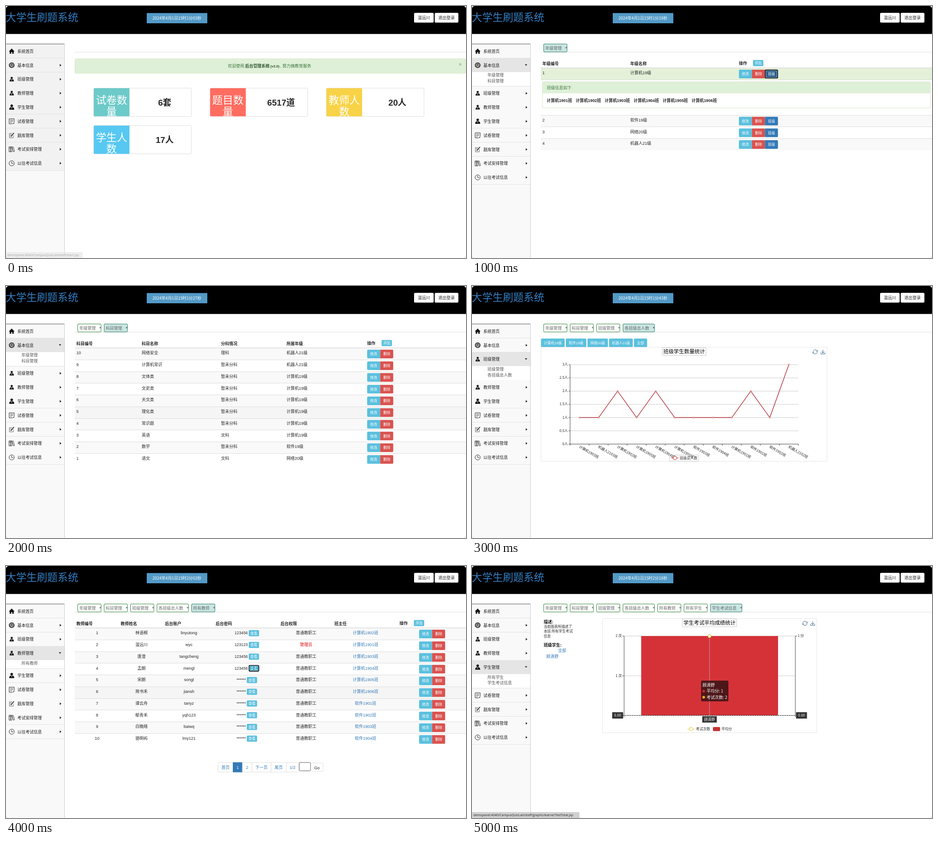
An HTML page with a canvas that plays this animation: 1010 by 554 pixels, repeating every 6000 ms.

```html
<!DOCTYPE html>
<html lang="zh-CN">
<head>
<meta charset="utf-8">
<title>刷题系统</title>
<style>
html, body { margin: 0; width: 100%; height: 100%; overflow: hidden; background: #fff; }
canvas { display: block; width: 1010px; height: 554px; }
</style>
</head>
<body>
<canvas id="stage"></canvas>
<script>
const W = 1010, H = 554, STEP = 1000;
const canvas = document.getElementById('stage');
const c = canvas.getContext('2d');
const dpr = window.devicePixelRatio || 1;
canvas.width = W * dpr;
canvas.height = H * dpr;

const ARIAL = '"Liberation Sans", "Noto Sans CJK SC", "Noto Sans CJK", sans-serif';
const UI = '"Noto Sans CJK SC", "Noto Sans CJK", sans-serif';
const URL_FONT = '"Open Sans", sans-serif';
const INFO = '#5bc0de', DANGER = '#d9534f', BLUE = '#337ab7', INK = '#262626', RED = '#c23531';

const ADMIN = '温远川', STUDENT = '顾清野';
const MENU = ['系统首页', '基本信息', '班级管理', '教师管理', '学生管理', '试卷管理', '题库管理', '考试安排管理', '以往考试信息'];
const TABS = ['年级管理', '科目管理', '班级管理', '各班级总人数', '所有教师', '所有学生', '学生考试信息'];

// ---- drawing helpers ----

// y is the vertical centre of the glyphs
function text(s, x, y, o = {}) {
  const size = o.size || 9;
  c.font = `${o.weight || 400} ${size}px ${o.font || ARIAL}`;
  c.textAlign = o.align || 'left';
  c.textBaseline = 'alphabetic';
  c.fillStyle = o.color || INK;
  c.fillText(s, x, y + size * 0.37);
}

function mid(s, x, y, o) { text(s, x, y, { ...o, align: 'center' }); }

function rect(x, y, w, h, fill) {
  c.fillStyle = fill;
  c.fillRect(x, y, w, h);
}

function box(x, y, w, h, fill, stroke, r = 0, lw = 1) {
  c.beginPath();
  c.roundRect(x, y, w, h, r);
  if (fill) { c.fillStyle = fill; c.fill(); }
  if (stroke) { c.strokeStyle = stroke; c.lineWidth = lw; c.stroke(); }
}

function path(pts, stroke, lw = 1, fill) {
  c.beginPath();
  pts.forEach(([x, y], i) => i ? c.lineTo(x, y) : c.moveTo(x, y));
  if (fill) { c.closePath(); c.fillStyle = fill; c.fill(); }
  if (stroke) { c.strokeStyle = stroke; c.lineWidth = lw; c.stroke(); }
}

function dot(x, y, r, fill, stroke, lw = 1) {
  c.beginPath();
  c.arc(x, y, r, 0, Math.PI * 2);
  if (fill) { c.fillStyle = fill; c.fill(); }
  if (stroke) { c.strokeStyle = stroke; c.lineWidth = lw; c.stroke(); }
}

function button(s, x, y, w, h, fill, r = 2) {
  box(x, y, w, h, fill, null, r);
  mid(s, x + w / 2, y + h / 2, { size: 7.75, color: '#fff', weight: 500 });
}

function focusRing(x, y, w, h) {
  box(x + .8, y + .8, w - 1.6, h - 1.6, null, '#fff', 1.5, .8);
  box(x - .4, y - .4, w + .8, h + .8, null, '#101010', 2, 1.6);
}

// ---- page frame ----

const person = s => (x, y) => {
  dot(x, y - 3 * s, 2.5 * s, '#111');
  c.beginPath();
  c.moveTo(x - 5 * s, y + 5 * s);
  c.quadraticCurveTo(x - 5 * s, y, x - 1.5 * s, y);
  c.lineTo(x + 1.5 * s, y);
  c.quadraticCurveTo(x + 5 * s, y, x + 5 * s, y + 5 * s);
  c.fill();
  path([[x, y + .4], [x + .9, y + 1.6], [x, y + 4], [x - .9, y + 1.6]], null, 1, '#ddd');
};

const ICONS = [
  (x, y) => {
    path([[x - 6.3, y + .6], [x, y - 5.8], [x + 6.3, y + .6]], null, 1, '#111');
    rect(x - 4.4, y, 8.8, 5.5, '#111');
    rect(x - 1.2, y + 2, 2.4, 3.5, '#f5f5f5');
  },
  (x, y) => {
    dot(x, y, 6.2, '#444');
    box(x - 3, y - 2.6, 6, 4, null, '#fff', .5, .9);
    path([[x - 2.2, y + 3], [x + 2.2, y + 3]], '#fff', .9);
  },
  person(.95), person(.95), person(1.1),
  (x, y) => {
    path([[x + 2, y + 5.5], [x - 5.5, y + 5.5], [x - 5.5, y - 5.5], [x + 5.5, y - 5.5], [x + 5.5, y + 2]], '#222');
    for (const k of [-2.5, 0, 2.5]) path([[x - 3.2, y + k], [x + (k > 1 ? 0 : 3.2), y + k]], '#222', .8);
    path([[x + 2, y + 5.5], [x + 5.8, y + 2], [x + 5.2, y + 5]], null, 1, '#222');
  },
  (x, y) => {
    path([[x + 3.5, y], [x + 3.5, y + 5.5], [x - 5, y + 5.5], [x - 5, y - 4], [x + 1, y - 4]], '#555', .9);
    path([[x - 2, y + 3], [x + 5, y - 5.2]], '#222', 1.7);
    path([[x - 3.5, y - 1.5], [x, y - 1.5]], '#555', .8);
    path([[x - 3.5, y + 1], [x - 1, y + 1]], '#555', .8);
  },
  (x, y) => {
    for (const k of [-5.8, -2.6]) {
      box(x + k, y - 5.5, 3, 11, null, '#222', 0, .9);
      path([[x + k, y - 2.8], [x + k + 3, y - 2.8]], '#222', .7);
    }
    path([[x + .8, y - 4.8], [x + 3.3, y - 5.5], [x + 6.2, y + 4.8], [x + 3.7, y + 5.5], [x + .8, y - 4.8]], '#222', .9);
  },
  (x, y) => {
    dot(x, y, 5.6, null, '#222', 1);
    path([[x, y - 3.6], [x, y + .4], [x + 3.4, y + .4]], '#222', 1);
  }
];

function header(time) {
  box(0, 0, W, 61.5, '#000', null, [6, 6, 0, 0]);
  text('大学生刷题系统', -.4, 25, { size: 22.75, color: '#337fc4', font: UI });
  rect(309, 15.5, 133, 22.5, '#539ac7');
  mid(time, 375.3, 26.7, { size: 8.85, color: '#fff', font: UI, weight: 500 });
  box(896, 15, 43, 21.5, '#fff', null, 2.5);
  box(941.3, 15, 52, 21.5, '#fff', null, 2.5);
  mid(ADMIN, 917.5, 26);
  mid('退出登录', 967.3, 26);
}

function sidebar(open, subs, itemFill) {
  rect(0, 83, 128, H - 83, '#f9f9f9');
  let y = 99.4;
  MENU.forEach((name, i) => {
    const top = Math.round(y - 15.4), active = i === open;
    rect(0, top, 128, 31, active ? '#e5e5e5' : itemFill);
    ICONS[i](12.5, y);
    text(name, 25, y, { size: 8.95, font: UI, color: '#1c1c1c', weight: 500 });
    if (active) path([[116, y - 2], [121.4, y - 2], [118.7, y + 1.2]], null, 1, INK);
    else if (i) path([[118, y - 2.8], [121.6, y], [118, y + 2.8]], null, 1, INK);
    if (active) {
      const h = 6 + 12.5 * subs.length;
      rect(0, y + 15, 128, h + 1, '#fff');
      subs.forEach((s, k) => text(s, 34, y + 21.7 + 12.5 * k, { size: 8.95, color: '#555', font: UI }));
      y += h;
    }
    rect(0, Math.round(y + 14.8), 128, 1, '#e2e2e2');
    y += 30.8;
  });
  rect(0, 83, 128, 1, '#555');
  rect(128, 83, 1, H - 83, '#ccc');
}

function tabs(count) {
  rect(151, 101, W - 151, 1, '#e1e1e1');
  let x = 157;
  TABS.slice(0, count).forEach((name, i) => {
    const w = name.length * 9 + 16.2, on = i === count - 1;
    box(x + .5, 83.5, w - 1, 17.5, on ? '#c9e6e5' : '#fff', on ? '#2f7d58' : '#2f8437', 1.5);
    text(name, x + 4, 92.8, { color: '#666', font: UI });
    mid('×', x + w - 2.4, 91, { size: 7, color: '#111' });
    x += w + 5.8;
  });
}

function statusBar(s, w, fill, color) {
  box(0, 541, w, 13, fill, null, [0, 2, 0, 0]);
  text(s, 3, 547.6, { size: 7, color, font: URL_FONT });
}

function corners() {
  c.strokeStyle = '#ddd';
  c.lineWidth = 1;
  for (const [x, from] of [[6, Math.PI / 2], [W - 6, 0]]) {
    c.beginPath();
    c.arc(x, H - 6, 6, from + .3, from + Math.PI / 2 - .3);
    c.stroke();
  }
}

// ---- tables ----

const PITCH = 25.75, TOP = 136.5, HOVERED = 5;

function heads(names, xs, addX) {
  names.forEach((s, i) => text(s, xs[i], s === '操作' ? 125.3 : 126.2, { weight: 700 }));
  button('添加', addX, 118.7, 22.7, 13.6, INFO);
  rect(151, 135.5, W - 151, 1.3, '#d8d8d8');
}

function rowBack(y, fill) {
  rect(151, y, W - 151, PITCH, fill);
  rect(151, Math.round(y - .4), W - 151, 1, '#ddd');
}

const stripe = i => i === HOVERED ? '#f5f5f5' : i % 2 ? '#fff' : '#f9f9f9';

function editButtons(x, y) {
  button('修改', x, y + 3.5, 28.6, 19, INFO, [2, 0, 0, 2]);
  button('删除', x + 28.6, y + 3.5, 28.6, 19, DANGER, [0, 2, 2, 0]);
}

// ---- charts ----

function chartIcons(x, y) {
  const col = '#4b7799';
  c.strokeStyle = col;
  c.lineWidth = 1.1;
  for (const a of [.2, Math.PI + .2]) {
    c.beginPath();
    c.arc(x, y, 4.6, a, a + 2.5);
    c.stroke();
  }
  path([[x + 5.4, y - 3.6], [x + 5.2, y - .2], [x + 2.2, y - 1.2]], col, 1);
  path([[x - 5.4, y + 3.6], [x - 5.2, y + .2], [x - 2.2, y + 1.2]], col, 1);
  const d = x + 17;
  path([[d, y - 4.6], [d, y + 2.6]], col, 1.1);
  path([[d - 3, y - .4], [d, y + 2.6], [d + 3, y - .4]], col, 1.1);
  path([[d - 4.5, y + 1.5], [d - 4.5, y + 4.8], [d + 4.5, y + 4.8], [d + 4.5, y + 1.5]], col, 1.1);
}

function chartTitle(s, x, y, w) {
  box(x - w / 2, y, w, 17.3, '#fff', '#ccc');
  mid(s, x, y + 8.3, { size: 11.45, color: '#000', font: UI });
}

const label = (s, x, y, o) => text(s, x, y, { size: 7.75, font: UI, ...o });

function legendLine(x, y, col) {
  path([[x, y], [x + 16, y]], col, 1.2);
  dot(x + 8, y, 3.8, '#fff', col, 1.2);
}

// ---- scenes ----

function home() {
  box(151.5, 116, 858, 32, '#dff0d8', '#d6e9c6', 2.5);
  const green = '#3c763d';
  text('欢迎使用', 487.3, 132, { color: green });
  text('后台管理系统', 525, 132, { color: '#2b542c', weight: 700, size: 8.95 });
  text('(v2.0)', 580.3, 132, { color: '#2b542c', weight: 700, size: 7.7 });
  text(', 努力做教育服务', 602, 132, { color: green });
  mid('×', 997.3, 128, { size: 10.5, color: '#a0aa9b', weight: 700 });
  const cards = [
    ['试卷数', '量', '6套', '#6ccac9'], ['题目数', '量', '6517道', '#ff6c60'],
    ['教师人', '数', '20人', '#f8d347'], ['学生人', '数', '17人', '#57c8f2']
  ];
  cards.forEach(([a, b, value, col], i) => {
    const x = 192.5 + 255.4 * (i % 3), y = 180.5 + 82.3 * Math.floor(i / 3);
    box(x, y, 214.5, 62.3, '#fff', '#ddd', 2.5);
    box(x + .3, y + .3, 78.3, 61.8, col, null, [2, 0, 0, 2]);
    const o = { size: 22.9, color: '#fff', weight: 300, font: UI };
    mid(a, x + 39.3, y + 25.6, o);
    mid(b, x + 39.3, y + 51, o);
    mid(value, x + 156, y + 31.7, { size: 18.8, weight: 700 });
  });
  statusBar('demopanel:4040/CampusQuizLab/staff/start.jsp', 168, 'rgba(236,236,236,.85)', '#aaa');
}

function grades() {
  heads(['年级编号', '年级名称', '操作'], [154.5, 347.5, 586], 617);
  ['计算机19级', '软件19级', '网络20级', '机器人21级'].forEach((name, i) => {
    const y = i ? 240 + PITCH * (i - 1) : TOP;
    rowBack(y, i ? (i % 2 ? '#f9f9f9' : '#fff') : '#e5f0d9');
    text(String(i + 1), 154.5, y + 10.5);
    text(name, 347.5, y + 10.5);
    editButtons(586, y);
    button('班级', 643.2, y + 3.5, 28.6, 19, i ? BLUE : '#286090', [0, 2, 2, 0]);
    if (!i) focusRing(644.3, y + 4.5, 26.4, 17);
  });
  rect(151, 162, W - 151, 1, '#ddd');
  box(154.5, 166.5, 852, 57.5, '#fff', '#d6e9c6', 2.5);
  box(155, 167, 851, 25, '#dff0d8', null, [2, 2, 0, 0]);
  text('班级信息如下', 164.3, 179.2, { color: '#3c763d' });
  for (let i = 0; i < 6; i++) text(`计算机190${i + 1}班`, 164.3 + 63.6 * i, 208.2, { weight: 700, size: 8.9 });
}

function subjects() {
  heads(['科目编号', '科目名称', '分科情况', '所属年级', '操作'], [154.5, 298, 472, 616, 793], 824.7);
  const names = ['网络安全', '计算机常识', '文体类', '文史类', '天文类', '理化类', '常识题', '英语', '数学', '语文'];
  const kinds = { 0: '理科', 7: '文科', 9: '文科' };
  const grade = i => i < 2 ? '机器人21级' : i < 8 ? '计算机19级' : i < 9 ? '软件19级' : '网络20级';
  names.forEach((name, i) => {
    const y = TOP + PITCH * i;
    rowBack(y, stripe(i));
    [10 - i, name, kinds[i] || '暂未分科', grade(i)].forEach((s, k) => text(String(s), [154.5, 298, 472, 616][k], y + 10.5));
    editButtons(793, y);
  });
}

function classChart() {
  [['计算机19级', 151.5, 52], ['软件19级', 206, 45], ['网络20级', 253.5, 45], ['机器人21级', 301, 52], ['全部', 355.7, 28.8]]
    .forEach(([s, x, w]) => button(s, x, 115.5, w, 18.7, INFO));
  box(151.5, 134.5, 628, 251, '#fff', '#e6e6e6');
  chartTitle('班级学生数量统计', 465.7, 135.3, 96.5);
  chartIcons(753.5, 144.7);

  const x0 = 215.3, y0 = 347.5, gap = 41.77, unit = 58.2;
  for (let i = 0; i <= 6; i++) {
    const y = y0 - i * unit / 2;
    rect(x0, y - .5, 501.3, 1, i ? '#ccc' : '#444');
    rect(x0 - 3.2, y - .5, 3.2, 1, '#444');
    label(i / 2 + '人', 210.5, y - .6, { align: 'right' });
  }
  rect(x0 - .5, y0 - 3 * unit, 1, 3 * unit, '#444');
  for (let i = 0; i <= 12; i++) rect(x0 + gap * i - .5, y0, 1, 3.4, '#444');

  const names = ['计算机1903', '机器人2103', '计算机1902', '计算机1905', '计算机1904', '计算机1906',
    '软件1903', '软件1904', '计算机1901', '软件1901', '软件1902', '机器人2102'];
  const pts = [1, 1, 2, 1, 2, 1, 1, 1, 1, 2, 1, 3].map((v, i) => [x0 + gap * (i + .5), y0 - v * unit]);
  path(pts, '#b02c34', 1.4);
  pts.forEach(([x, y], i) => {
    dot(x, y, 1.4, '#fff', RED, .8);
    c.save();
    c.translate(x - .3, 352.6);
    c.rotate(Math.PI / 6);
    label(names[i] + '班', 0, 0, { weight: 500 });
    c.restore();
  });
  box(433.5, 371.5, 64, 13.5, null, '#ccc');
  legendLine(437.5, 378, RED);
  label('班级总人数', 456, 377.7);
}

function teachers() {
  heads(['教师编号', '教师姓名', '后台账户', '后台密码', '后台权限', '班主任', '操作'],
    [154.5, 251.8, 349, 460.3, 602.8, 721, 864], 895.5);
  const staff = [['林语桐', 'linyutong'], [ADMIN, 'wyc'], ['唐澄', 'tangcheng'], ['孟朗', 'mengl'], ['宋朗', 'songl'],
    ['简书禾', 'jiansh'], ['谭云舟', 'tanyz'], ['郁青禾', 'yqh123'], ['白晚晴', 'baiwq'], ['骆明屿', 'lmy121']];
  const rooms = [2, 1, 3, 4, 5, 6, 1, 2, 3, 4];
  staff.forEach(([name, login], i) => {
    const y = TOP + PITCH * i, t = y + 10.5, shown = i < 4;
    rowBack(y, stripe(i));
    mid(String(i + 1), 200, t);
    mid(name, 297.5, t);
    mid(login, 401.7, t);
    text(shown ? (i === 1 ? '123123' : '123456') : '******', shown ? 531 : 526.7, t, { align: 'right', size: 8.8 });
    const bx = shown ? 533 : 528.7;
    button('查看', bx, y + 4.4, 22.6, 13.6, i === 3 ? '#269abc' : INFO);
    if (i === 3) focusRing(bx + 1, y + 5.2, 20.6, 12);
    mid(i === 1 ? '管理员' : '普通教职工', 659, t, { color: i === 1 ? '#e00000' : INK, weight: i === 1 ? 500 : 400 });
    mid(`${i < 6 ? '计算机' : '软件'}190${rooms[i]}班`, 789.5, t, { color: BLUE });
    editButtons(907, y);
  });

  let x = 465.5;
  [['首页', 33], ['1', 20.5], ['2', 21], ['下一页', 42], ['尾页', 33.5], ['1/2', 27.5]].forEach(([s, w], i) => {
    const on = i === 1;
    box(x, 432, w, 21, on ? BLUE : '#fff', on ? BLUE : '#ddd', i ? 0 : [2.5, 0, 0, 2.5]);
    mid(s, x + w / 2, 442.5, { color: on ? '#fff' : BLUE });
    x += w;
  });
  box(643.8, 432, 24.7, 18.3, '#fff', '#555', 2);
  box(669.2, 433, 27, 18.5, '#fff', '#ddd', 2);
  mid('Go', 682.7, 443.5);
}

function examChart() {
  text('描述:', 157.5, 122.2, { weight: 700, color: '#111' });
  ['当前图表所描述了', '本班 所有学生考试', '信息'].forEach((s, i) => label(s, 157.5, 132.8 + 10.8 * i));
  text('班级学生:', 157.5, 173.2, { weight: 700, color: '#111' });
  text('全部', 189, 185.5, { color: BLUE });
  text(STUDENT, 163, 198.2, { color: BLUE });

  box(286.5, 115.5, 470.5, 251, '#fff', '#e6e6e6');
  chartTitle('学生考试平均成绩统计', 521.5, 116.3, 119);
  chartIcons(731, 126);

  for (const y of [153.5, 241]) {
    rect(334, y, 376, 1, '#ccc');
    rect(330.5, y, 3.5, 1, '#444');
  }
  rect(710, 153.5, 3.5, 1, '#444');
  label('2 次', 329, 153.4, { align: 'right' });
  label('1 次', 329, 240.8, { align: 'right' });
  label('1 分', 715, 153.4);
  rect(371.5, 154, 300.5, 174.5, '#d53238');
  rect(333.5, 154, 1, 178, '#444');
  rect(709.5, 154, 1, 178, '#444');
  rect(331, 328, 382, 1, '#888');
  c.setLineDash([3, 2]);
  path([[331, 328.5], [713, 328.5]], '#222', 1);
  c.setLineDash([]);
  rect(521, 154, 1, 174.5, '#b99a9a');
  dot(521.5, 154, 3.4, '#fff', '#e3c52f', 1.3);

  const tag = (s, x, y, w) => {
    rect(x, y, w, 14, '#333');
    mid(s, x + w / 2, y + 6.8, { size: 7.75, color: '#fff', font: UI, weight: 500 });
  };
  tag('0.00', 307.8, 321.4, 24);
  tag('0.00', 711.5, 321.4, 24);
  tag(STUDENT, 505.5, 330.2, 32);

  box(503, 252, 60, 45.5, 'rgba(30,14,16,.74)', null, 2.5);
  const tip = (s, x, y) => text(s, x, y, { color: '#fff', font: UI, weight: 500 });
  tip(STUDENT, 506, 262);
  dot(508.7, 275.3, 3, '#c9292f');
  tip('平均分: 1', 515, 275);
  dot(508.7, 288.5, 3, '#f4a61a');
  tip('考试次数: 2', 515, 288.3);

  legendLine(473.3, 358.5, '#e8cf45');
  label('考试次数', 491.8, 358);
  box(529, 354, 15.8, 9, RED, null, 2);
  label('平均分', 547.5, 358);
  statusBar('demopanel:4040/CampusQuizLab/staff/graphs/learnerTestTotal.jsp', 236, '#d0d0d0', '#222');
}

const SCENES = [
  { time: '1分03', tabs: 0, draw: home },
  { time: '1分19', tabs: 1, open: 1, subs: [0, 1], draw: grades },
  { time: '1分27', tabs: 2, open: 1, subs: [0, 1], draw: subjects },
  { time: '1分43', tabs: 4, open: 2, subs: [2, 3], draw: classChart },
  { time: '2分02', tabs: 5, open: 3, subs: [4], draw: teachers },
  { time: '2分18', tabs: 7, open: 4, subs: [5, 6], draw: examChart }
];

function render(scene) {
  c.setTransform(dpr, 0, 0, dpr, 0, 0);
  rect(0, 0, W, H, '#fff');
  header(`2024年4月1日15时${scene.time}秒`);
  sidebar(scene.open, (scene.subs || []).map(i => TABS[i]), scene.open ? '#f9f9f9' : '#f2f2f2');
  tabs(scene.tabs);
  scene.draw();
  corners();
}

let shown = -1, start;
function tick(now) {
  start ??= now;
  const i = Math.floor((now - start) / STEP) % SCENES.length;
  if (i !== shown) render(SCENES[shown = i]);
  requestAnimationFrame(tick);
}
requestAnimationFrame(tick);
</script>
</body>
</html>
```
